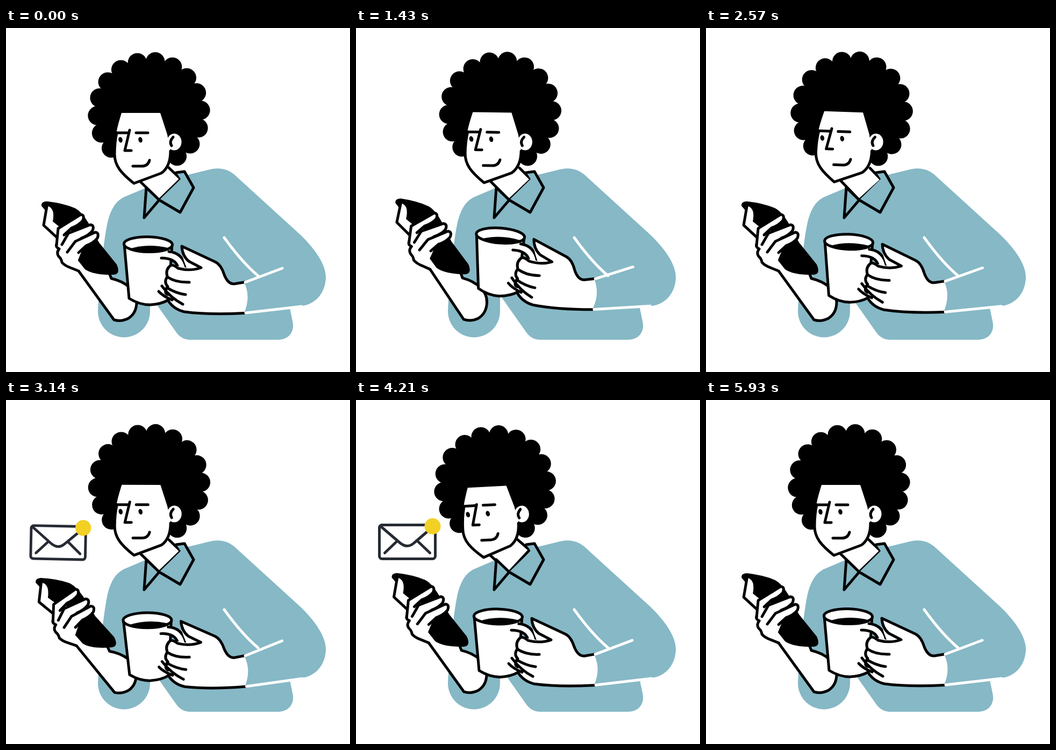
Write an HTML page with a canvas that moves like this. It is 640 px wide and 640 px high and loops after 6000 ms.

```html
<!DOCTYPE html>
<html lang="en">
<head>
<meta charset="utf-8">
<title>Coffee and a message</title>
<style>
html, body { margin: 0; width: 100%; height: 100%; overflow: hidden; background: #fff; }
canvas { display: block; width: 640px; height: 640px; }
</style>
</head>
<body>
<canvas id="stage"></canvas>
<script>
const LOOP = 6000;
const TEAL = '#86b8c6', INK = '#000', PAPER = '#fff', SLATE = '#262a33', YELLOW = '#f3d024';
const RAD = Math.PI / 180;
const canvas = document.getElementById('stage');
const ctx = canvas.getContext('2d');
const dpr = window.devicePixelRatio || 1;
canvas.width = canvas.height = 640 * dpr;

// Turning angles in degrees as [time, value], eased between neighbours.
const headTilt = [[0, 0], [800, 0], [2250, 2.35], [4250, -2.95], [LOOP, 0]];
const mugTilt = [[0, 0], [1420, 3.2], [2000, 3.2], [3150, -1.4], [4400, 0], [LOOP, 0]];
const phoneTilt = [[0, 0], [760, 3.2], [1400, 2.1], [2000, 2.1], [3400, -3.7],
  [3700, -3.7], [4600, 2.7], [5250, 2.4], [LOOP, 0]];

function ease(t, from, to) {
  const p = Math.min(1, Math.max(0, (t - from) / (to - from)));
  return (1 - Math.cos(Math.PI * p)) / 2;
}

function at(keys, t) {
  const i = keys.findIndex(key => key[0] > t);
  const [t0, a] = keys[i - 1], [t1, b] = keys[i];
  return a + (b - a) * ease(t, t0, t1);
}

function fill(d, color = PAPER) {
  ctx.fillStyle = color;
  ctx.fill(new Path2D(d));
}

function line(d, color = INK) {
  ctx.strokeStyle = color;
  ctx.lineWidth = 5;
  ctx.stroke(new Path2D(d));
}

function shape(d, color) {
  fill(d, color);
  line(d);
}

function oval(x, y, rx, ry, color, tilt = 0) {
  ctx.fillStyle = color;
  ctx.beginPath();
  ctx.ellipse(x, y, rx, ry, tilt, 0, 2 * Math.PI);
  ctx.fill();
}

function turned(x, y, deg, draw) {
  ctx.save();
  ctx.translate(x, y);
  ctx.rotate(deg * RAD);
  ctx.translate(-x, -y);
  draw();
  ctx.restore();
}

function torso() {
  fill('M261 297L221 314C203 322 194 339 188 366C181 400 173 480 171 527' +
    'A48.5 48.5 0 0 0 268 527V497L316 565Q326 580 343 580H506C526 580 538 565 533 545' +
    'L528 521L550 517C578 514 595 490 595 463C595 440 575 411 548 385L424 272' +
    'Q405 257 380 263L335 274L285 320Z', TEAL);
  line('M406 390Q440 437 469 461', PAPER);
}

function collar() {
  shape('M261 297L257 353L285 320Z', TEAL);
  fill('M317 269L332 267L349 297L324 343L285 320L325 281Z', TEAL);
  line('M317 269L332 267L349 297L324 343L285 320');
}

function neck() {
  shape('M250 286L285 320L325 281L303 260');
}

function hair() {
  oval(266, 158, 97, 97, INK);
  for (let i = 0; i < 15; i++) {
    const a = (57 - 20 * i) * RAD;
    oval(266 + 96 * Math.cos(a), 158 + 96 * Math.sin(a), 17.8, 17.8, INK);
  }
}

function head(lift) {
  hair();
  fill('M215 158H287L300 198L306 228C306 256 302 265 289 270L238 289' +
    'C214 270 202 256 202 235C202 202 207 184 215 158Z');
  oval(313, 212, 13.5, 15.5, PAPER);
  line('M206 195Q202 213 202 235C202 256 214 270 238 289L289 270Q306 258 306 229');
  line('M311 203Q303 211 308 219M230 190L221 228H233M236 257H253Q264 257 267 246');
  const brow = 195 - lift;
  line(`M206 ${brow}H227M242 ${brow}H264`);
  for (const x of [213, 250]) oval(x, 208, 3.7, 5.2, INK, -0.25);
}

// Knuckle, bend and tip; the underside follows from the tip.
function finger(kx, ky, bx, by, tx, ty) {
  shape(`M${kx} ${ky}L${bx} ${by}L${tx} ${ty}q8 1 4 11q-7 9 -21 14l-14 13`);
}

function phoneHand() {
  fill('M105 437L135 452L201 543L243 510L196 466L134 425Z');
  shape('M135 452L201 543Q215 547 228 540Q243 530 243 510C243 488 222 472 196 466L192 456');
  fill('M66 331Q65 323 76 322.5Q107 326 128 335C146 344 160 374 173 399L206 440' +
    'Q214 458 200 459Q163 460 147 449L128 425L92 385L72 338Z', INK);
  fill('M76 331L70 367L95 390L112 380L87 360Q92 334 76 331Z');
  line('M76 332L70 367L95 390');
  fill('M95 400L98 425L105 437L120 446L137 452L133 434L144 407L148 383L110 375Z');
  finger(94, 404, 97, 373, 139, 347);
  finger(104, 403, 116, 382, 157, 366);
  finger(114, 417, 129, 397, 166, 380);
  line('M94 402Q92 408 99 411Q93 418 98 425Q103 429 104 436Q109 442 120 446L135 452');
}

function mug() {
  shape('M220 402L229 503Q248 515 268 515Q288 514 302 506L309 402');
  oval(264.5, 402.5, 45, 14, PAPER, 0.02);
  ctx.stroke();
  fill('M229 411Q263 400 301 409Q293 418 266 418Q240 418 229 411Z', INK);
  fill('M289 428L303 416Q328 418 335 445L320 448Q316 428 289 428Z');
  line('M303 416Q328 418 335 445M289 428Q315 428 320 445');
}

function mugHand() {
  fill('M327 406L390 436Q400 442 405 455Q412 476 425 476L443 473Q456 500 443 530' +
    'Q380 534 330 526Q310 521 301 507L297 484L299 460L307 441L336 446Q325 420 327 406Z');
  line('M443 473L425 476Q413 477 406 459Q400 440 389 435L327 406' +
    'Q328 424 340 434L363 446Q342 453 320 447Q313 441 307 441Q296 449 300 462');
  for (let i = 0; i < 2; i++) {
    const y = 463 + 20 * i;
    line(`M${300 - i} ${y}Q${316 + i} ${y + 11} ${341 - 7 * i} ${y + 10 + 3 * i}`);
    line(`M300 ${y}q-7 10 1 ${18 - 5 * i}`);
  }
  line('M290 480Q306 502 329 514M284 490Q292 499 309 506');
  line('M301 506Q311 523 332 528Q377 534 443 530.5');
  line('M445 473L514 447M446 530L550 518', PAPER);
}

// Leaves towards the phone while it shrinks and turns.
function mail(away) {
  if (away > 0.995) return;
  ctx.save();
  ctx.translate(95.5 + 71 * away, 264.5 + 57 * away);
  ctx.rotate(50 * away * RAD);
  ctx.scale(1 - away, 1 - away);
  ctx.beginPath();
  ctx.roundRect(-52, -32, 104, 63, 5);
  ctx.fillStyle = PAPER;
  ctx.fill();
  line('M-49 -29L-14 1Q0 13 13 1L48 -29M-42 20L-19 -2M42 20L19 -2', SLATE);
  ctx.stroke();
  oval(47, -29.5, 15, 15, YELLOW);
  ctx.restore();
}

function draw(t) {
  ctx.setTransform(dpr, 0, 0, dpr, 0, 0);
  ctx.fillStyle = PAPER;
  ctx.fillRect(0, 0, 640, 640);
  ctx.lineCap = ctx.lineJoin = 'round';
  const tilt = at(headTilt, t);
  torso();
  turned(285, 320, tilt, neck);
  collar();
  turned(313, 302, tilt, () => head(Math.max(0, -tilt)));
  mail(1 - ease(t, 2600, 3200) + ease(t, 5180, 5800));
  turned(222, 525, at(phoneTilt, t), phoneHand);
  turned(560, 470, at(mugTilt, t), () => {
    mug();
    mugHand();
  });
}

function tick() {
  draw(performance.now() % LOOP);
  requestAnimationFrame(tick);
}
tick();
</script>
</body>
</html>
```
